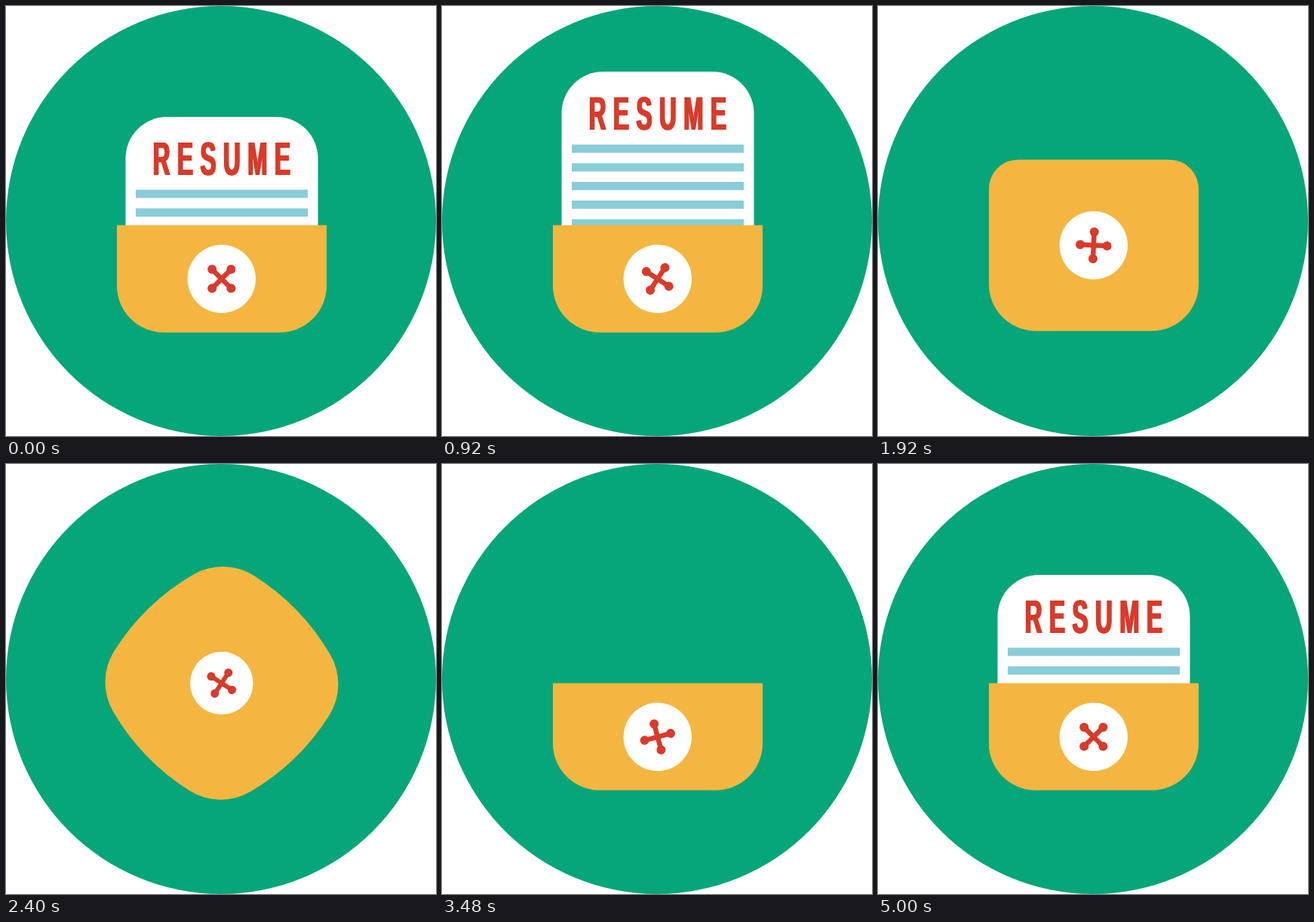
Recreate the animation shown at these times as an HTML page with a canvas. Size 570 px wide and 570 px high, loop 5.32 s.

```html
<!DOCTYPE html>
<html lang="en">
<head>
<meta charset="utf-8">
<title>Resume</title>
<style>
html, body { margin: 0; width: 100%; height: 100%; overflow: hidden; background: #fff; }
canvas { display: block; }
</style>
</head>
<body>
<canvas width="570" height="570" role="img" aria-label="Resume in a buttoned folder"></canvas>
<script>
const ctx = document.querySelector('canvas').getContext('2d');
const LOOP = 5320, STEP = 40, TAU = Math.PI * 2;
const CX = 286, CY = 290.5, REST_Y = 361.7;
const GREEN = '#05a679', YELLOW = '#f4b640', RED = '#d93a29', BLUE = '#89cdd8';

// Start times of the phases
const FLY = 1160, CLOSE = 1720, TURN = 2040, SHRINK = 2300, GROW = 2920, REFILL = 3480;

const lerp = (a, b, u) => a + (b - a) * u;
const ramp = (t, start, length) => Math.min(1, Math.max(0, (t - start) / length));
const easeOut = u => 1 - (1 - u) ** 2;
const backOut = u => 1 + 2.7 * (u - 1) ** 3 + 1.7 * (u - 1) ** 2;

// Counts up in accelerating moves with a pause after each
function notches(t, period, move, count) {
  const n = Math.floor(t / period);
  return Math.min(count, n + ramp(t % period, 0, move) ** 1.5);
}
const pullOut = t => notches(t, 360, 280, 3);
const refill = t => notches(Math.max(0, t - REFILL), 410, 290, 4);

function disc(x, y, r, color) {
  ctx.fillStyle = color;
  ctx.beginPath();
  ctx.arc(x, y, r, 0, TAU);
  ctx.fill();
}

function box(x, y, w, h, radii, color) {
  ctx.fillStyle = color;
  ctx.beginPath();
  ctx.roundRect(x, y, w, h, radii);
  ctx.fill();
}

function paperTop(t) {
  if (t < FLY) return 147 - 23 * pullOut(t);
  if (t < GROW) return 78 - 43 * ((t - FLY) / 440) ** 3.8;
  const stops = [291, 267, 202, 171, 147], p = refill(t), n = Math.min(3, Math.floor(p));
  return lerp(stops[n], stops[n + 1], p - n);
}

function spin(t) {
  if (t < FLY) return 30 * pullOut(t);
  return Math.min(210, 90 + 0.063 * (t - FLY)) + 37.5 * refill(t);
}

function drawTitle(y) {
  ctx.save();
  ctx.translate(194.8, y);
  ctx.scale(0.5, 1);
  ctx.font = 'bold 63px "Liberation Sans", Arial, sans-serif';
  ctx.letterSpacing = '19px';
  ctx.fillStyle = RED;
  // repeated side by side for heavier stems
  for (const dx of [-2, 0, 2]) ctx.fillText('RESUME', dx, 0);
  ctx.restore();
}

function drawPaper(top) {
  if (top < -270 || top > 290) return;
  ctx.save();
  ctx.beginPath();
  ctx.rect(0, 0, 570, 330);
  ctx.clip();
  box(158.5, top, 255, 265, 55, '#fff');
  drawTitle(top + 76.8);
  ctx.fillStyle = BLUE;
  for (let i = 0; i < 5; i++) ctx.fillRect(172, top + 96.5 + i * 24.75, 228, 11);
  ctx.fillRect(184, top + 220.3, 123, 11);
  ctx.restore();
}

// Square with round corners and bulging sides; q = 1 is a circle
function drawPillow(m, q, angle) {
  const R = m / q, r = m * (0.446 + 0.554 * q * q);
  const b = Math.acos((R - m) / (R - r) / Math.SQRT2) - Math.PI / 4;
  const c = (R - r) * Math.sin(b);
  ctx.save();
  ctx.translate(CX, CY);
  ctx.rotate(angle * TAU / 360);
  ctx.fillStyle = YELLOW;
  ctx.beginPath();
  for (let i = 0; i < 4; i++) {
    ctx.arc(m - R, 0, R, -b, b);
    ctx.arc(c, c, r, b, Math.PI / 2 - b);
    ctx.rotate(Math.PI / 2);
  }
  ctx.fill();
  ctx.restore();
}

function drawButton(y, scale, angle) {
  ctx.save();
  ctx.translate(CX - 0.2, y);
  ctx.scale(scale, scale);
  disc(0, 0, 45.2, '#fff');
  ctx.rotate(angle * TAU / 360);
  ctx.strokeStyle = RED;
  ctx.lineWidth = 6.5;
  const k = 12.6;
  ctx.beginPath();
  for (const s of [-1, 1]) {
    ctx.moveTo(-k, -k * s);
    ctx.lineTo(k, k * s);
  }
  ctx.stroke();
  for (const x of [-k, k]) for (const y of [-k, k]) disc(x, y, 6, RED);
  ctx.restore();
}

// The pocket closes into a square
function closePocket(t) {
  const u = ramp(t, CLOSE, TURN - CLOSE), r = 62 * u;
  const top = lerp(290.5, 151.5, u), bottom = lerp(432.7, 429.5, u);
  box(147, top, 278, bottom - top, [r, r, 62, 62], YELLOW);
  drawButton(lerp(REST_Y, CY, u), 1, spin(t));
}

// The square turns, rounds off and shrinks
function shrinkSquare(t) {
  const u = ramp(t, SHRINK, GROW - SHRINK);
  const q = Math.min(0.999, 0.001 + 2.8 * u);
  drawPillow(lerp(139, 12, u ** 3), q, 46 * easeOut(ramp(t, TURN, 360)));
  drawButton(CY, lerp(1, 0.18, u ** 1.3), spin(t));
}

// The dot grows, drops and opens into the pocket again
function openPocket(t) {
  const size = ramp(t, GROW, 200), open = ramp(t, GROW + 280, 200);
  const y = lerp(CY, REST_Y, backOut(ramp(t, GROW + 160, 320)));
  const r = lerp(12, 67, size), w = lerp(r, 139, open), h = lerp(r, 71, open);
  const rt = r * (1 - open), rb = lerp(r, 62, open);
  box(CX - w, y - h - 0.2, w * 2, h * 2, [rt, rt, rb, rb], YELLOW);
  drawButton(y, lerp(0.18, 1, size), spin(t));
}

function frame(now) {
  const t = Math.floor(now % LOOP / STEP) * STEP;
  ctx.fillStyle = '#fff';
  ctx.fillRect(0, 0, 570, 570);
  disc(285, 285, 285, GREEN);
  drawPaper(paperTop(t));
  if (t < TURN) closePocket(t);
  else if (t < GROW) shrinkSquare(t);
  else openPocket(t);
  requestAnimationFrame(frame);
}
frame(0);
</script>
</body>
</html>
```
